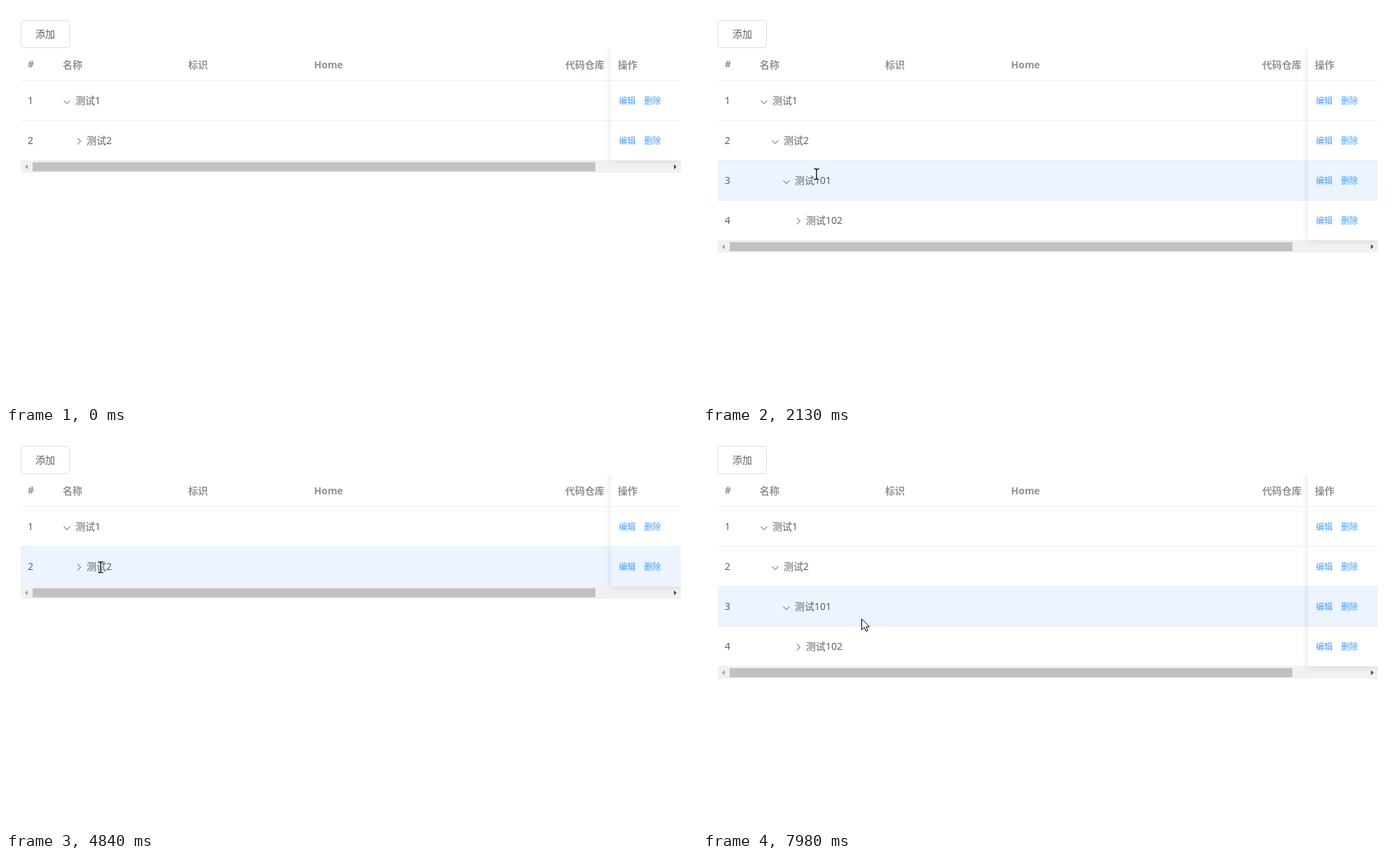
Animation, 986 px wide and 568 px high, one loop 8 s. Source, as an HTML page:

```html
<!DOCTYPE html>
<html lang="zh-CN">
<head>
<meta charset="utf-8">
<title>树形表格</title>
<style>
html, body { margin: 0; width: 100%; height: 100%; overflow: hidden; background: #fff; }
svg { display: block; width: 986px; height: 568px; }
text { font: 14px "Noto Sans", "Noto Sans CJK SC", "Noto Sans CJK", sans-serif; fill: #606266; white-space: pre; }
.head text { font-weight: 700; fill: #909399; }
.link { font-size: 12px; fill: #409eff; }
.line { fill: #ebeef5; }
.chevron { fill: none; stroke: #8d9095; stroke-width: 1.1; }
.fixed { fill: #fff; filter: drop-shadow(0 0 5px rgba(0, 0, 0, .12)); }
.solid { fill: #fff; stroke: #000; stroke-linejoin: round; }
.beam { fill: none; stroke: #000; stroke-width: 1.3; }
.halo { fill: none; stroke: #fff; stroke-width: 2.8; }
</style>
</head>
<body>
<svg viewBox="0 0 986 568">
  <defs>
    <clipPath id="table"><rect id="clip" x="21" y="60" width="942" height="178"/></clipPath>
    <path id="ibeam" d="M-3.5 -7.5h2q1.5 0 1.5 1.5q0 -1.5 1.5 -1.5h2M0 -6V6M-3.5 7.5h2q1.5 0 1.5 -1.5q0 1.5 1.5 1.5h2"/>
  </defs>

  <rect x="21.5" y="20.5" width="69" height="39" rx="3.5" fill="#fff" stroke="#dcdfe6"/>
  <text x="42" y="45">添加</text>

  <g clip-path="url(#table)">
    <g id="rows"></g>
    <g id="bar">
      <rect x="21" width="942" height="17" fill="#f1f1f1"/>
      <rect id="thumb" x="38" y="2" width="803" height="13"/>
      <path d="M27 8.5L31 5V12Z" fill="#a3a3a3"/>
      <path d="M957 8.5L953 5V12Z" fill="#505050"/>
    </g>
    <rect id="fixed" class="fixed" x="863" y="60" width="100"/>
    <g id="actions"></g>
    <rect class="line" x="21" y="106" width="942" height="1"/>
  </g>

  <g class="head">
    <text x="31" y="88">#</text>
    <text x="81" y="89">名称</text>
    <text x="260" y="89">标识</text>
    <text x="439.5" y="89">Home</text>
    <text x="798" y="89">代码仓库</text>
    <text x="873" y="89">操作</text>
  </g>

  <g id="cursor">
    <path data-shape="arrow" class="solid" d="M.5 .7V16.3L4.2 12.9L6.7 18.5L9.2 17.4L6.8 12H11.5Z"/>
    <g data-shape="beam">
      <use href="#ibeam" class="halo"/><use href="#ibeam" class="beam"/>
    </g>
    <g data-shape="hand" class="solid">
      <path d="M-1.6 13.5V2a1.6 1.6 0 0 1 3.2 0V8.5a1.7 1.5 0 0 1 3.4 0a1.7 1.5 0 0 1 3.4 .6a1.6 1.5 0 0 1 3.2 .8V16q0 3 -2 5v2.3h-8.6v-2.3L-5.4 14.6q-.8 -2 .8 -2.5q1.5 0 3 1.9Z"/>
      <path d="M1.6 8.5v4M5 8.7v3.8M8.4 9.2v3.5" fill="none"/>
    </g>
    <circle id="click" r="12" fill="#ff0" fill-opacity=".5"/>
  </g>
</svg>

<script>
const LOOP = 8000, TOP = 107, ROW = 57, SPIN = 200, TICK = 80;
const $ = id => document.getElementById(id);
const names = ['测试1', '测试2', '测试101', '测试102'];

// Toggle times [ms, open] of the expandable rows
const toggles = {
  1: [[150, 1], [4230, 0], [6260, 1]],
  2: [[620, 1], [3530, 0], [7280, 1]]
};
const clicks = [[3370, 3530], [4070, 4230], [6100, 6260], [7110, 7280]];

// Pointer moves: start, end, x, y, shape
const moves = [
  [1250, 1250, 771, 359, 'arrow'],
  [1330, 1970, 186, 239, 'arrow'],
  [2060, 2130, 162, 240, 'beam'],
  [2290, 2370, 148, 227, 'arrow'],
  [2450, 2520, 160, 238, 'arrow'],
  [2840, 2910, 134, 248, 'beam'],
  [3070, 3070, 124.5, 249, 'hand'],
  [3220, 3220, 123.5, 250, 'hand'],
  [3690, 3840, 112, 215, 'arrow'],
  [3920, 3920, 105, 195, 'hand'],
  [4380, 4530, 173, 188, 'arrow'],
  [4690, 4770, 150, 190, 'beam'],
  [4840, 4840, 135, 193, 'beam'],
  [4930, 5090, 119, 193, 'beam'],
  [5250, 5330, 113, 186, 'arrow'],
  [5470, 5860, 105, 195, 'hand'],
  [6490, 6640, 110, 222, 'arrow'],
  [6720, 6870, 121, 250, 'hand'],
  [6960, 7030, 119, 249, 'hand'],
  [7500, 7740, 213, 253, 'arrow'],
  [7840, 7980, 226, 266, 'arrow']
];

names.forEach((name, i) => {
  const y = TOP + ROW * i, base = y + 33;
  $('rows').innerHTML += `<g>
    <rect class="bg" x="21" y="${y}" width="942" height="56"/>
    <rect class="line" x="21" y="${y + 56}" width="942" height="1"/>
    <text x="31" y="${base}">${i + 1}</text>
    <path class="chevron" d="M-1 -4.5L3.5 0L-1 4.5"/>
    <text x="${99 + 16 * i}" y="${base}">${name}</text></g>`;
  $('actions').innerHTML += `<g>
    <rect class="bg" x="863" y="${y}" width="100" height="56"/>
    <rect class="line" x="863" y="${y + 56}" width="100" height="1"/>
    <text class="link" x="874.5" y="${base - .5}">编辑</text>
    <text class="link" x="910.5" y="${base - .5}">删除</text></g>`;
});
const rows = [...$('rows').children], actions = [...$('actions').children];
const shapes = [...document.querySelectorAll('[data-shape]')];
const show = (el, on) => el.setAttribute('visibility', on ? 'inherit' : 'hidden');

function fold(i, t) {
  if (i === 0) return { open: 1, angle: 90 };
  const last = (toggles[i] || []).filter(([at]) => at <= t).pop();
  if (!last) return { open: 0, angle: 0 };
  const p = Math.min(1, (t - last[0]) / SPIN);
  return { open: last[1], angle: 90 * (last[1] ? p : 1 - p) };
}

function pointer(t) {
  const i = moves.findLastIndex(m => m[0] <= t);
  if (i < 0) return null;
  const [start, end, x, y, shape] = moves[i];
  const [, , px, py] = moves[Math.max(0, i - 1)];
  const n = Math.round((end - start) / TICK) + 1;
  const k = n > 1 ? Math.floor((t - start) / (end - start) * (n - 1) + .001) + 1 : 1;
  const p = Math.min(1, k / n), e = p * (2 - p);
  return { x: px + (x - px) * e, y: py + (y - py) * e, shape };
}

function render(t) {
  const folds = names.map((_, i) => fold(i, t));
  let count = 1;
  while (count < names.length && folds[count - 1].open) count++;
  const bottom = TOP + ROW * count;
  const cur = pointer(t);
  const inside = cur && cur.y < bottom && cur.y >= TOP;
  const hover = inside ? Math.floor((cur.y - TOP) / ROW) : -1;

  rows.forEach((row, i) => {
    const fill = i === hover ? '#ebf4ff' : '#fff';
    for (const g of [row, actions[i]]) {
      show(g, i < count);
      g.querySelector('.bg').setAttribute('fill', fill);
    }
    row.querySelector('.chevron').setAttribute('transform',
      `translate(${87 + 16 * i} ${TOP + ROW * i + 29}) rotate(${folds[i].angle})`);
  });

  const onThumb = cur && cur.y >= bottom && cur.y < bottom + 17 && cur.x >= 38 && cur.x < 841;
  $('thumb').setAttribute('fill', onThumb ? '#a8a8a8' : '#c1c1c1');
  $('bar').setAttribute('transform', `translate(0 ${bottom})`);
  $('fixed').setAttribute('height', bottom - 60);
  $('clip').setAttribute('height', bottom + 17 - 60);

  show($('cursor'), cur);
  if (cur) {
    $('cursor').setAttribute('transform', `translate(${Math.round(cur.x)} ${Math.round(cur.y)})`);
    shapes.forEach(s => show(s, s.dataset.shape === cur.shape));
  }
  show($('click'), clicks.some(([a, b]) => t >= a && t < b));
}

function loop() {
  render(performance.now() % LOOP);
  requestAnimationFrame(loop);
}
loop();
</script>
</body>
</html>
```
